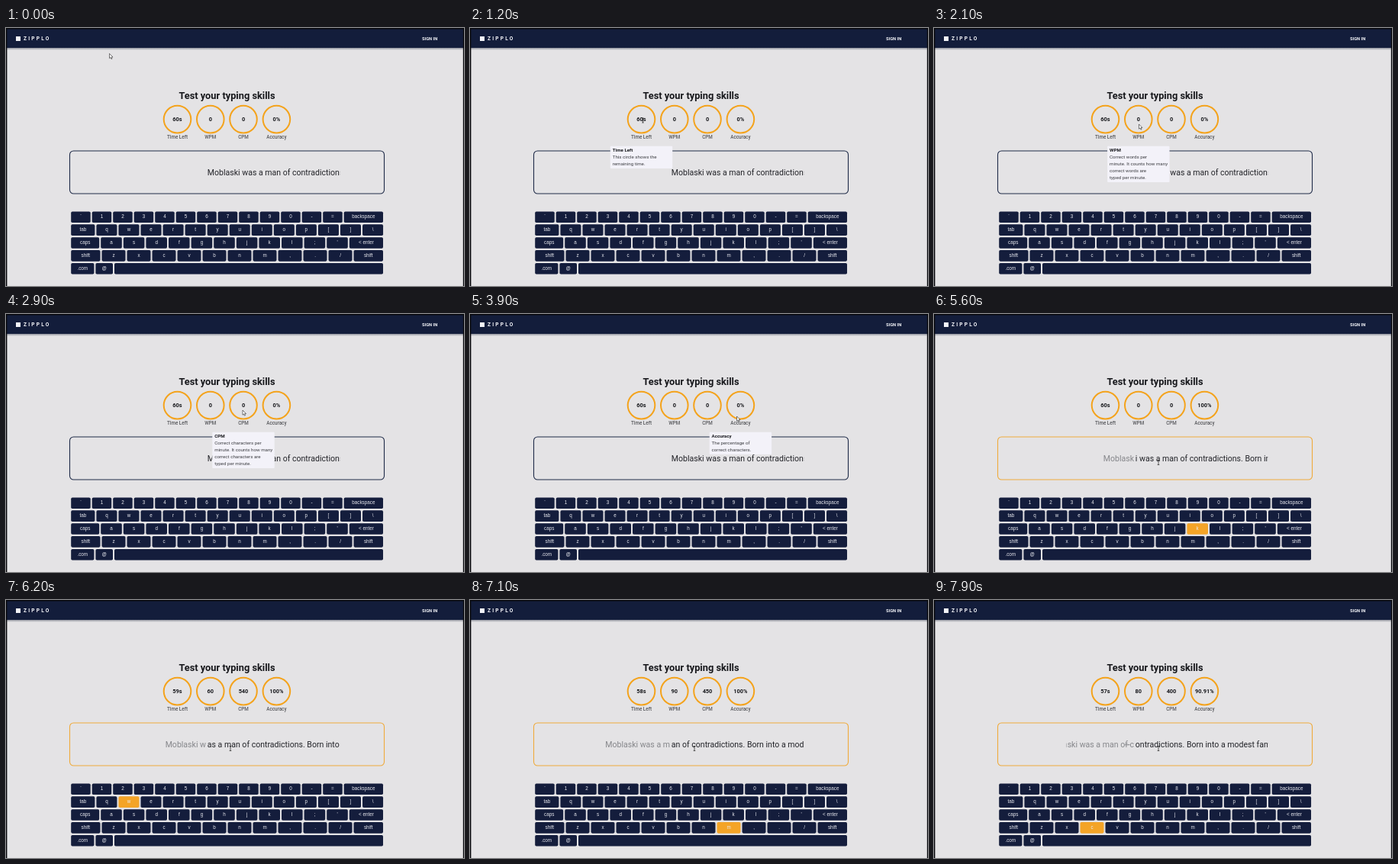
An HTML page that plays this animation: 600 px wide and 338 px high, repeating every 8000 ms.

```html
<!DOCTYPE html>
<html lang="en">
<head>
<meta charset="utf-8">
<title>Typing test</title>
<style>
  html, body { margin: 0; width: 100%; height: 100%; overflow: hidden; background: #e4e3e5; }
  svg { display: block; width: 600px; height: 338px; }
  text { font-family: Roboto, Arial, sans-serif; white-space: pre; fill: #17181c; }
  .mid { text-anchor: middle; }
  .bold { font-weight: 700; }
  .nav { fill: #f4f5f9; font-weight: 700; }
  .value { font-size: 7.4px; font-weight: 700; }
  .label { font-size: 6.3px; font-weight: 500; fill: #55565a; }
  .ring { fill: none; stroke: #f4a31c; stroke-width: 2; }
  .key rect { fill: #141d3c; }
  .key text { font: 6.3px "Liberation Sans", Arial, sans-serif; fill: #e9eaf0; }
  .key.on rect { fill: #f4a427; }
  .quote { font-size: 10.56px; fill: #222328; }
  #typed { text-anchor: end; fill: #85868a; }
  #wrong { text-decoration: line-through; }
  .tip text { font-size: 6.2px; fill: #3c3d42; }
  .tip .bold { fill: #17181c; }
</style>
</head>
<body>
<svg id="stage" viewBox="0 0 600 338" xmlns="http://www.w3.org/2000/svg">
  <defs>
    <linearGradient id="shade" x2="0" y2="1">
      <stop offset="0" stop-color="#555a6a" stop-opacity=".6"/>
      <stop offset="1" stop-color="#555a6a" stop-opacity="0"/>
    </linearGradient>
    <clipPath id="leftClip"><rect x="173.5" y="175" width="89" height="28"/></clipPath>
    <clipPath id="rightClip"><rect x="263" y="175" width="174.3" height="28"/></clipPath>
  </defs>
  <rect width="600" height="338" fill="#e4e3e5"/>
  <rect y="26" width="600" height="3" fill="url(#shade)"/>
  <rect width="600" height="26" fill="#131d3b"/>
  <path d="M0 .7H600M.7 0V338M599.5 0V338" stroke="#08090d" stroke-width="1.4"/>
  <rect x="13" y="11" width="6" height="6" fill="#f4f5f9"/>
  <text class="nav" x="23" y="16.2" font-size="6.6" letter-spacing="2.2">ZIPPLO</text>
  <text class="nav" x="545" y="15.6" font-size="5.7">SIGN IN</text>
  <text class="mid bold" x="289.5" y="92.6" font-size="12.8">Test your typing skills</text>
  <g id="stats"></g>
  <rect id="box" x="83.5" y="161" width="412" height="56" rx="5" fill="none" stroke-width="1.1"/>
  <g clip-path="url(#leftClip)">
    <text id="typed" class="quote" x="262" y="193"><tspan id="right"></tspan><tspan id="wrong"></tspan><tspan id="after"></tspan></text>
  </g>
  <g clip-path="url(#rightClip)"><text id="rest" class="quote" x="263.8" y="193"></text></g>
  <g id="keys"></g>
  <g id="tips"></g>
  <g id="cursor">
    <path id="arrow" d="M0 0V6.2L1.5 5L2.5 7.2L3.5 6.7L2.6 4.6H4.5Z" fill="#fff" stroke="#222" stroke-width=".6"/>
    <path id="beam" d="M-1.3 -3H1.3M0 -3V3M-1.3 3H1.3" fill="none" stroke="#333" stroke-width=".8"/>
  </g>
</svg>
<script>
  const LOOP = 8000, STEP = 100, FOCUS = 4400;
  const QUOTE = "Moblaski was a man of contradictions. Born into a modest family";
  const WRONG = [20, 22];
  const STROKES = [4800, 5000, 5100, 5200, 5300, 5400, 5600, 5700, 5800, 6100, 6300, 6400,
    6500, 6700, 6800, 7000, 7200, 7300, 7400, 7500, 7600, 7700, 7900];
  // time, seconds left, words per minute, characters per minute
  const TICKS = [[0, 60, 0, 0], [5900, 59, 60, 540], [6900, 58, 90, 450], [7800, 57, 80, 400]];
  // time, x, y
  const PATH = [[0, 135.5, 33.5], [300, 137, 36], [900, 224, 119], [1200, 226.5, 121],
    [1500, 228, 121], [2000, 268, 126], [2400, 271, 126], [2800, 309, 126], [2900, 310, 126],
    [3200, 312, 126], [3500, 352, 126], [3800, 356, 127], [4300, 294, 194.5]];
  const STATS = [
    [224.5, "Time Left", ["This circle shows the", "remaining time."]],
    [267.8, "WPM", ["Correct words per", "minute. It counts how many", "correct words are", "typed per minute."]],
    [311, "CPM", ["Correct characters per", "minute. It counts how many", "correct characters are", "typed per minute."]],
    [354.4, "Accuracy", ["The percentage of", "correct characters."]]
  ];

  const $ = id => document.getElementById(id);
  function add(parent, tag, attrs, content = "") {
    const node = document.createElementNS("http://www.w3.org/2000/svg", tag);
    for (const name in attrs) node.setAttribute(name, attrs[name]);
    node.textContent = content;
    return parent.appendChild(node);
  }
  const show = (node, on) => node.setAttribute("visibility", on ? "visible" : "hidden");

  const values = [], tips = [], keys = {};
  for (const [x, name, lines] of STATS) {
    add($("stats"), "circle", { class: "ring", cx: x, cy: 119.6, r: 17.8 });
    values.push(add($("stats"), "text", { class: "value mid", x, y: 122.2 }));
    add($("stats"), "text", { class: "label mid", x, y: 145.4 }, name);

    const tip = add($("tips"), "g", { class: "tip" });
    add(tip, "rect", { x: x - 40.7, y: 154.7, width: 81.4, height: 11.4 + 9 * lines.length, rx: 1, fill: "#f3f2f9" });
    add(tip, "text", { class: "bold", x: x - 37.8, y: 162.2 }, name);
    lines.forEach((line, i) => add(tip, "text", { x: x - 37.8, y: 171.3 + 9 * i }, line));
    tips.push(tip);
  }

  function addKey(name, x, row, width) {
    const y = 240.5 + 16.85 * row;
    const key = add($("keys"), "g", { class: "key" });
    add(key, "rect", { x, y, width, height: 14.6, rx: 1.8 });
    add(key, "text", { class: "mid", x: x + width / 2, y: y + 8.9 }, name);
    keys[name] = key;
  }
  // first key, its width, characters, pitch, last key
  const ROWS = [
    ["`", 25.5, "1234567890-=", 27.5, "backspace"],
    ["tab", 31.2, "qwertyuiop[]\\", 29.05, ""],
    ["caps", 37, "asdfghjkl;'", 29.6, "< enter"],
    ["shift", 38.3, "zxcvbnm,./", 33, "shift"],
    [".com", 30.2, "", 0, ""]
  ];
  ROWS.forEach(([first, width, chars, pitch, last], row) => {
    let x = 85.2;
    addKey(first, x, row, width);
    x += width + 2;
    for (const c of chars) {
      addKey(c, x, row, pitch - 2);
      x += pitch;
    }
    if (last) addKey(last, x, row, 494 - x);
  });
  addKey("@", 117.4, 4, 22.6);
  addKey(" ", 142, 4, 352);

  function pointer(t) {
    const i = PATH.findIndex(p => p[0] > t);
    if (i < 0) return PATH[PATH.length - 1].slice(1);
    const [t0, x0, y0] = PATH[i - 1], [t1, x1, y1] = PATH[i];
    const u = (t - t0) / (t1 - t0), k = u * u * (3 - 2 * u);
    return [x0 + (x1 - x0) * k, y0 + (y1 - y0) * k];
  }

  function accuracy(n) {
    if (!n) return "0%";
    const total = Math.max(1, n - 1);
    const bad = Math.max(0, Math.min(total, WRONG[1]) - WRONG[0]);
    return bad ? (100 * (total - bad) / total).toFixed(2) + "%" : "100%";
  }

  function draw(t) {
    const [x, y] = pointer(t);
    const hover = STATS.findIndex(s => Math.hypot(x - s[0], y - 119.6) < 18.5);
    const overText = hover >= 0 && y < 123.5 && Math.abs(x - STATS[hover][0]) < 7;
    const beam = overText || y > 161;
    tips.forEach((tip, i) => show(tip, i === hover));
    show($("beam"), beam);
    show($("arrow"), !beam);
    $("cursor").setAttribute("transform", `translate(${x} ${y})`);

    const n = STROKES.filter(s => s <= t).length;
    const [, left, wpm, cpm] = TICKS.filter(k => k[0] <= t).pop();
    [left + "s", wpm, cpm, accuracy(n)].forEach((v, i) => { values[i].textContent = v; });

    $("box").setAttribute("stroke", t >= FOCUS ? "#efab3c" : "#202c49");
    const typed = QUOTE.slice(0, n);
    $("right").textContent = typed.slice(0, WRONG[0]);
    $("wrong").textContent = typed.slice(...WRONG);
    $("after").textContent = typed.slice(WRONG[1]);
    $("rest").textContent = QUOTE.slice(n);

    const pressed = n ? QUOTE[n - 1].toLowerCase() : null;
    for (const name in keys) keys[name].classList.toggle("on", name === pressed);
  }

  const start = performance.now();
  function frame() {
    const t = (performance.now() - start) % LOOP;
    draw(Math.floor(t / STEP) * STEP);
    requestAnimationFrame(frame);
  }
  frame();
</script>
</body>
</html>
```
